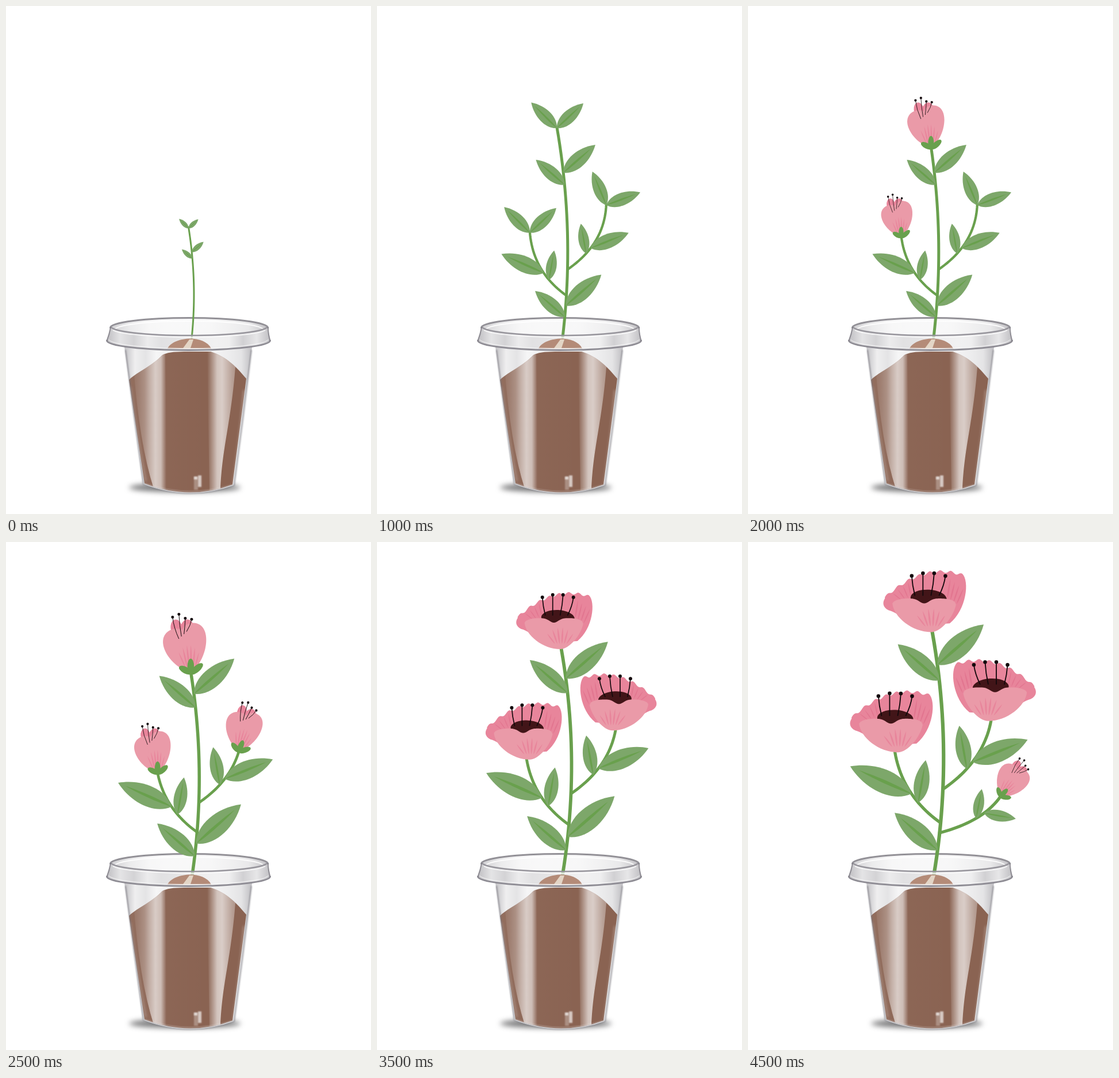
Animation, 635 px wide and 882 px high, one loop 5 s. Source, as an HTML page with a canvas:

```html
<!DOCTYPE html>
<html lang="en">
<head>
<meta charset="utf-8">
<title>Growing plant</title>
<style>
html, body { margin: 0; width: 100%; height: 100%; overflow: hidden; background: #fff; }
canvas { display: block; }
</style>
</head>
<body>
<canvas id="stage" width="635" height="882"></canvas>
<script>
const ctx = document.getElementById('stage').getContext('2d');
const STEP = 500;
const STEM = '#69a04d', LEAF = '#7da76a', PINK = '#ea9aa8', DEEP = '#e8859b', STREAK = '#e27690', INK = '#14090c', EYE = '#421518';
const rad = deg => deg * Math.PI / 180;
const white = a => `rgba(255,255,255,${a})`;
const grey = a => `rgba(120,118,126,${a})`;

// ---------- helpers ----------
function at(x, y, turn, sx, sy, draw) {
  ctx.save();
  ctx.translate(x, y);
  ctx.rotate(rad(turn));
  ctx.scale(sx, sy);
  draw();
  ctx.restore();
}

function fill(path, style) {
  ctx.fillStyle = style;
  ctx.fill(path);
}

function oval(x, y, rx, ry, turn, color) {
  const p = new Path2D();
  p.ellipse(x, y, rx, ry, rad(turn), 0, 7);
  fill(p, color);
}

function stroke(path, width, style) {
  ctx.lineWidth = width;
  ctx.strokeStyle = style;
  ctx.lineCap = 'round';
  ctx.stroke(path);
}

// line along a function of t
function trace(point, from, to, width, color) {
  const p = new Path2D(), n = 24;
  for (let i = 0; i <= n; i++) p.lineTo(...point(from + (to - from) * i / n));
  stroke(p, width, color);
}

// pointed shape along an angle
function blade(x, y, angle, len, half, color) {
  const h = len * half / .75;
  at(x, y, angle, 1, 1, () => fill(new Path2D(
    `M0 0 C${len * .2} ${-h} ${len * .65} ${-h} ${len} 0 C${len * .65} ${h} ${len * .2} ${h} 0 0`), color));
}

function streak(x1, y1, x2, y2, half, color) {
  const angle = Math.atan2(y2 - y1, x2 - x1) * 180 / Math.PI;
  blade(x1, y1, angle, Math.hypot(x2 - x1, y2 - y1), half, color);
}

function leaf([x, y], angle, len) {
  blade(x, y, angle, len, .175, LEAF);
  blade(x, y, angle, len * .86, .028, STEM);
}

// ---------- flowers ----------
function stamen(hx, hy, bx, by, width) {
  stroke(new Path2D(`M${hx} ${hy} Q${hx + (bx - hx) * .2} ${(hy + by) / 2} ${bx} ${by}`), width, INK);
  oval(hx, hy, 3, 3, 0, INK);
}

function petal(turn, len, w) {
  at(0, -4, turn, 1, 1, () => fill(new Path2D(
    `M0 0 C${-w * .7} ${-len * .3} ${-w * .8} ${-len} 0 ${-len} C${w * .8} ${-len} ${w * .7} ${-len * .3} 0 0`), PINK));
}

function bud() {
  oval(-31, -97, 12, 18, -8, DEEP);
  oval(-9, -96, 14, 19, 8, DEEP);
  petal(-26, 99, 52);
  petal(3, 104, 50);
  for (let u = -2.5; u < 3; u++) streak(u * 4 - 2, -14, u * 8.5 - 5, -62 + u * u * 2.5, .035, DEEP);
  for (let i = 0; i < 4; i++) stamen(-39 + 13.3 * i, -120 - 6 * Math.sin(i * 1.8), -26 + 5.5 * i, -75 - 5 * i, 1.2);
  oval(-12, -9, 15, 7, 28, STEM);
  oval(12, -12, 16, 7, -42, STEM);
  oval(-1, -17, 7, 16, 0, STEM);
}

function bloom() {
  const back = new Path2D('M-70 -35 C-80 -40 -80 -48 -76 -54');
  for (let x = -76; x <= 48; x += 2) back.lineTo(x, -97 + .005 * (x - 15) ** 2 + 2.2 * Math.sin(x * .37));
  back.bezierCurveTo(60, -82, 55, -36, 28, -14);
  back.lineTo(-34, -10);
  back.quadraticCurveTo(-56, -32, -70, -35);
  fill(back, DEEP);
  for (let i = 0; i < 4; i++) {
    streak(24 + 5 * i, -54 + 3 * i, 29 + 7 * i, -85 + 5 * i, .04, STREAK);
    streak(-34 - 5 * i, -57 + 2 * i, -39 - 8 * i, -80 + 6 * i, .04, STREAK);
  }
  oval(-6, -54, 29, 14, 3, EYE);

  const front = new Path2D('M-64 -46 C-62 -24 -32 0 -2 0 C14 0 34 -24 38 -44');
  for (let x = 36; x >= -62; x -= 2) front.lineTo(x, -54 + 8 * Math.exp(-(((x + 13) / 11) ** 2)) + 6 * ((x + 13) / 50) ** 6);
  front.closePath();
  fill(front, PINK);
  for (let u = -2.5; u < 3; u++) streak(u * 4 - 1, -9, u * 9 - 2, -38 + u * u * 1.8, .05, DEEP);
  for (let i = 0; i < 4; i++) stamen(-33 + 18 * i, -90 - 5 * Math.sin(i * 1.05), -28 + 13 * i, -59, 1.7);
}

// ---------- plant ----------
// leaves: place along the stem, angle, full length
const MAIN_LEAVES = [[340, -41, 97], [315, -139, 87], [42, -139, 90], [65, -41, 108]];
// foot: height on the main stem; bend and end: curve; leafy and open: reach with leaf pair or bloom
const TWIGS = [
  { foot: 86, bend: [-58, -41], end: [-72, -105.5], leafy: 1.2, open: 1.06, turn: 0, side: 1,
    leaves: [[.5, -156, 106], [.36, -80, 68]] },
  { foot: 140, bend: [56, -38], end: [73, -92], leafy: 1.38, open: 1.16, turn: 22.5, side: -1,
    leaves: [[.4, -100, 69], [.52, -22, 94]] },
  { foot: 70, bend: [69, -18], end: [97, -57], turn: 45,
    leaves: [[.5, -79, 47], [.64, 10, 51]] }
];

const young = { grow: .84, sink: -2, bow: 10.5, leaf: .76, twigs: 2 };
const grown = { grow: 1, sink: 0, bow: 15.5, leaf: 1, twigs: 2 };
const stages = [
  { grow: .44, sink: 0, bow: 9, leaf: .28, twigs: 0, top: 384, leaves: 2 },
  { grow: .68, sink: 0, bow: 10, leaf: .52, twigs: 2, top: 262 },
  { ...young, top: 210 },
  { ...young, top: 249, buds: [.71] },
  { ...young, top: 249, buds: [.71, .6], reach: 1.1 },
  { grow: .945, sink: 8, bow: 14, leaf: .96, twigs: 2, top: 230, buds: [.83, .7, .69] },
  { ...grown, top: 199, buds: [1, 1, 1] },
  { ...grown, top: 186, bloom: 1 },
  { ...grown, top: 186, bloom: 1 },
  { grow: 1.08, sink: 3.5, bow: 16, leaf: 1.1, twigs: 3, top: 156.5, leaves: 3, bloom: 1.085, buds: [0, 0, 0, .6] }
];

function plant({ grow, sink, bow, leaf: size, twigs, top, leaves = 4, buds = [], bloom: open, reach = 1 }) {
  const peak = 150 + 2.5 * bow;
  const main = h => [323 + grow * bow * (1 - ((h - peak) / peak) ** 2), 577 + sink - grow * h];
  const width = .8 + 5 * grow;
  const stems = [{ path: main, tip: (577 + sink - top) / grow, turn: 0, side: 1, shift: 0, width, leaves: MAIN_LEAVES.slice(0, leaves) }];

  TWIGS.slice(0, twigs).forEach((twig, i) => {
    const [x, y] = main(twig.foot), { bend, end } = twig;
    const on = (t, k) => grow * (2 * t * (1 - t) * bend[k] + t * t * end[k]);
    const path = t => [x + on(t, 0), y + on(t, 1)];
    const tip = buds[i + 1] ? reach : open ? twig.open : twig.leafy;
    stems.push({ ...twig, path, tip, shift: 7 * twig.side, width: width * .85 });
  });

  for (const s of stems) {
    trace(s.path, 0, s.tip, s.width, STEM);
    for (const [place, angle, len] of s.leaves) leaf(s.path(place), angle, len * size);
  }
  stems.forEach((s, i) => {
    const [x, y] = s.path(s.tip);
    if (buds[i]) at(x, y, s.turn, buds[i], buds[i], bud);
    else if (open) at(x + s.shift, y, 0, open * s.side, open, bloom);
    else for (const spread of [-135, -43]) leaf([x, y + 2], spread + s.turn, 83 * size);
  });
}

// ---------- cup ----------
const bodyPath = new Path2D('M206 592 L238 830 Q319 861 397 832 L428 592 Z');
const soilPath = new Path2D('M214 649 C231 633 252 627 272 606 Q282 600 310 600 L356 600 C386 610 402 628 418 647 L394 831 Q319 859 241 829 Z');
const leftShine = new Path2D('M222 628 Q232 760 257 838 L280 844 L277 598 L222 598 Z');
const rightShine = new Path2D('M350 598 L354 846 L373 842 C376 760 394 720 401 598 Z');

// horizontal gradient with evenly spaced opacities
function sheen(x1, x2, tone, alphas) {
  const g = ctx.createLinearGradient(x1, 0, x2, 0);
  alphas.forEach((a, i) => g.addColorStop(i / (alphas.length - 1), tone(a)));
  return g;
}

function ring(cx, cy, rx, ry, from, to, width, style) {
  const p = new Path2D();
  p.ellipse(cx, cy, rx, ry, 0, from, to);
  stroke(p, width, style);
}

function blurred(px, draw) {
  ctx.save();
  ctx.filter = `blur(${px}px)`;
  draw();
  ctx.restore();
}

function cupBack() {
  blurred(5, () => oval(311, 836, 97, 8, 0, 'rgba(30,30,32,.6)'));
  fill(bodyPath, '#fff');
  fill(bodyPath, sheen(206, 428, grey, [.45, .12, .2, .07, .1, .07, .07, .07, .1, .1, .14, .2, .48]));

  fill(soilPath, '#8a6352');
  fill(soilPath, sheen(213, 418, white, [.07, .02, 0, 0]));
  ctx.save();
  ctx.clip(soilPath);
  fill(leftShine, sheen(222, 279, white, [.06, .14, .25, .48, .66, .56, 0]));
  fill(rightShine, sheen(350, 402, white, [0, .3, .62, .68, .54, .4, .28]));
  blurred(2, () => {
    stroke(new Path2D('M414 668 Q408 740 396 828'), 3, white(.3));
    stroke(new Path2D('M216 662 Q228 750 243 824'), 3, white(.25));
  });
  ctx.restore();

  blurred(.8, () => {
    stroke(new Path2D('M208 598 Q223 715 239 830 Q319 861 397 832 Q413 715 427 598'), 2.2, grey(.62));
    stroke(new Path2D('M241 829 Q319 856 394 831'), 1.2, white(.5));
    ctx.fillStyle = white(.28);
    ctx.fillRect(327, 817, 7, 23);
    ctx.fillStyle = white(.65);
    ctx.fillRect(327, 817, 6, 5);
    ctx.fillRect(334, 815, 6, 20);
  });

  oval(318.5, 558.5, 137, 17, 0, '#fff');
  oval(318.5, 558.5, 137, 17, 0, sheen(182, 456, grey, [.34, .14, .06, .05, .05, .06, .1, .16, .45]));
  ring(318.5, 562, 129, 15, Math.PI, 2 * Math.PI, 2, white(.9));
  ring(318.5, 558.5, 137, 17, Math.PI, 2 * Math.PI, 3, '#939197');
}

function cupFront() {
  const skirt = new Path2D();
  skirt.ellipse(318.5, 558.5, 137, 15, 0, Math.PI, 0, true);
  skirt.ellipse(317.5, 581, 142.5, 17, 0, 0, Math.PI);
  skirt.closePath();
  fill(skirt, white(.7));
  fill(skirt, sheen(175, 460, grey, [.48, .2, .32, .14, .22, .2, .14, .12, .1, .12, .34, .18, .48]));

  fill(new Path2D('M281 594.5 C292 574 344 570 357 594.5 Z'), '#b48b78');
  fill(new Path2D('M319 579 L326 579 L321 594 L308 594 Z'), '#e3d5c6');

  blurred(.6, () => {
    ring(318.5, 556.5, 136, 15.5, 0, Math.PI, 2.6, '#96949b');
    ring(318.5, 560, 135, 15, .2, Math.PI - .2, 1.5, white(.8));
    ring(317.5, 581, 142, 16.5, 0, Math.PI, 2.8, '#8e8c94');
    ring(317.5, 578, 139, 16.5, .1, Math.PI - .1, 1.3, white(.6));
    stroke(new Path2D('M182 558 Q180 570 175.5 581 M456 558 Q456 570 459.5 581'), 2, grey(.7));
  });
}

// ---------- loop ----------
let shown = -1;
function tick(now) {
  const step = Math.floor(now / STEP) % stages.length;
  if (step !== shown) {
    shown = step;
    ctx.fillStyle = '#fff';
    ctx.fillRect(0, 0, 635, 882);
    cupBack();
    plant(stages[step]);
    cupFront();
  }
  requestAnimationFrame(tick);
}
tick(0);
</script>
</body>
</html>
```
